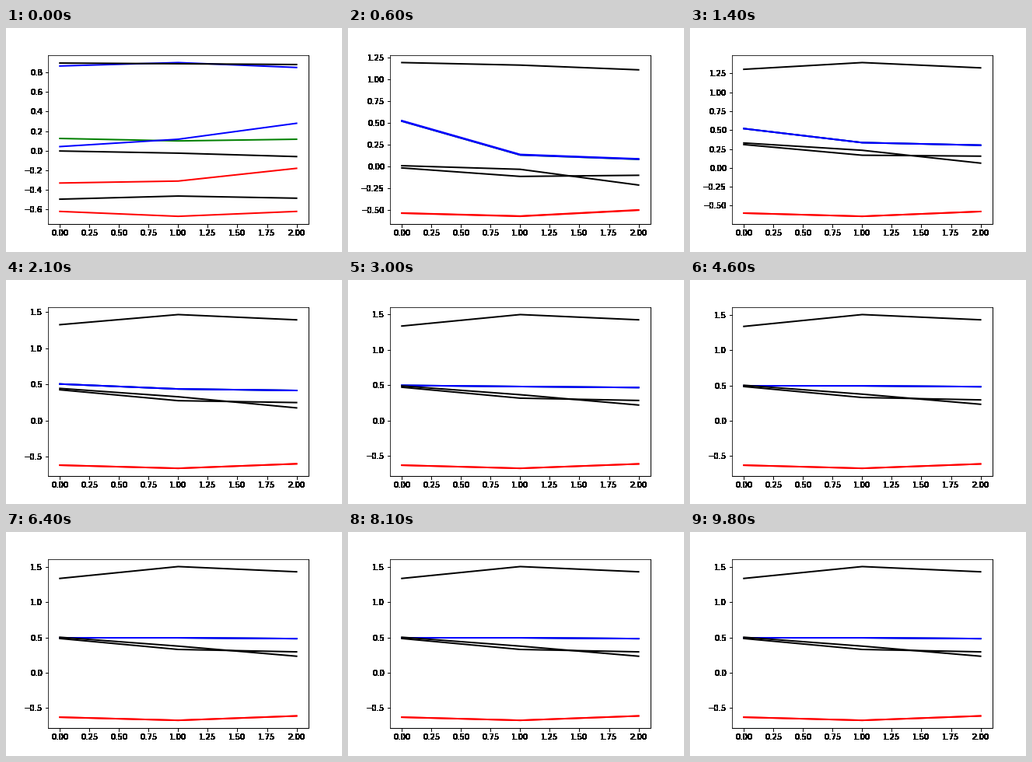
A matplotlib script that plays this animation: 432 by 288 pixels, repeating every 9900 ms.

```python
import numpy as np
import matplotlib.pyplot as plt
from matplotlib.animation import FuncAnimation

FRAMES = 99
INTERVAL = 100
MERGE = 0.8    # rate at which members join their group
SETTLE = 0.2   # rate at which a group comes to rest
X = [0, 1, 2]

plt.rcParams.update({"font.family": "DejaVu Sans", "font.size": 10})


def vec(*values):
    return np.array(values)


class Group:
    """Lines that merge, then settle like a critically damped spring."""

    def __init__(self, starts, rest, push):
        self.mean = np.mean(starts, axis=0)
        self.offsets = starts - self.mean
        self.rest = rest
        self.push = push

    def member(self, index, t):
        swing = (self.mean - self.rest + self.push * t) * np.exp(-SETTLE * t)
        return self.rest + swing + self.offsets[index] * np.exp(-MERGE * t)


red_starts = vec((-.33, -.31, -.18), (-.62, -.67, -.62))
blue_starts = vec((.125, .10, .117), (.865, .90, .85), (.042, .117, .28))
top_start = vec((.895, .888, .88))
pair_starts = vec((-.003, -.025, -.06), (-.495, -.463, -.485))

reds = Group(red_starts, vec(-.63, -.674, -.612), .025)
blues = Group(blue_starts, vec(.495, .495, .483), vec(.04, -.18, -.21))
top = Group(top_start, vec(1.336, 1.504, 1.43), vec(-.005, -.085, -.085))
upper = Group(pair_starts, vec(.503, .377, .234), vec(-.15, -.125, -.165))
lower = Group(pair_starts, vec(.485, .33, .296), vec(-.155, -.15, -.125))

series = [(reds, 0, "red"), (reds, 1, "red"),
          (blues, 0, "green"), (blues, 1, "blue"), (blues, 2, "blue"),
          (top, 0, "black"), (upper, 0, "black"), (lower, 1, "black")]


def harden(image, dpi):
    """Make every touched pixel fully opaque."""
    image[..., 3] = image[..., 3] > 0
    return image, 0, 0


fig = plt.figure(figsize=(6, 4), dpi=72, facecolor="white")
ax = fig.add_axes([0.125, 0.125, 0.775, 0.755])
lines = [ax.plot(X, group.member(i, 0), color=color, lw=2)[0]
         for group, i, color in series]

# Everything outside the plot area has hard edges
for part in (ax.xaxis, ax.yaxis, ax.spines["bottom"], ax.spines["right"]):
    part.set_agg_filter(harden)


def update(frame):
    values = [group.member(i, frame) for group, i, _ in series]
    for line, y in zip(lines, values):
        line.set_ydata(y)
    low, high = np.min(values), np.max(values)
    pad = 0.05 * (high - low)
    ax.set_ylim(low - pad, high + pad)
    return lines


anim = FuncAnimation(fig, update, frames=FRAMES, interval=INTERVAL,
                     init_func=lambda: update(0), repeat=True, repeat_delay=0)
plt.show()
```
